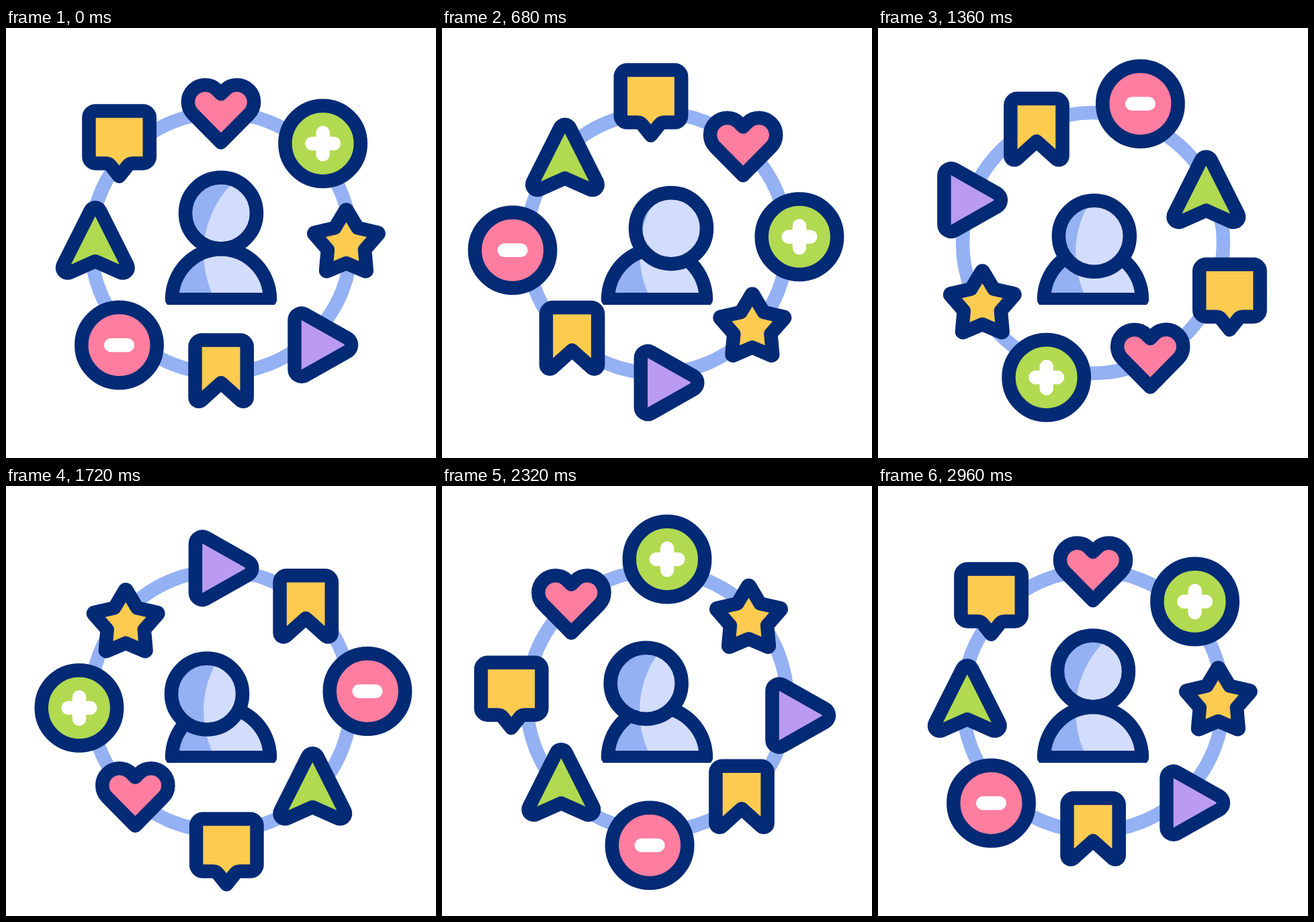
An HTML page with a canvas that plays this animation: 640 px wide and 640 px high, repeating every 3 s.

```html
<!DOCTYPE html>
<html>
<head>
<meta charset="utf-8">
<style>
html, body { margin: 0; width: 100%; height: 100%; overflow: hidden; background: #fff; }
canvas { display: block; }
</style>
</head>
<body>
<canvas id="stage" width="640" height="640"></canvas>
<script>
const ctx = document.getElementById('stage').getContext('2d');
const LOOP = 3000, HEAD_REST = 40, ORBIT_REST = 66, LINE = 20.5;
const NAVY = '#032a75', BLUE = '#94b1f4', PALE = '#d2dcfd', WHITE = '#fff';
const YELLOW = '#fdcb50', PINK = '#ff7d9f', GREEN = '#b1da51', PURPLE = '#bb9bf2';

// Closed polygon from [x, y, corner radius] points
function polygon(points) {
  const path = new Path2D(), n = points.length;
  const [ax, ay] = points[0], [zx, zy] = points[n - 1];
  path.moveTo((ax + zx) / 2, (ay + zy) / 2);
  points.forEach(([x, y, r], i) => {
    const [nx, ny] = points[(i + 1) % n];
    if (r) path.arcTo(x, y, nx, ny, r);
    else path.lineTo(x, y);
  });
  path.closePath();
  return path;
}

function circle(x, y, r) {
  const path = new Path2D();
  path.arc(x, y, r, 0, 2 * Math.PI);
  return path;
}

function star(x, y, outer, inner) {
  return polygon(Array.from({ length: 10 }, (_, i) => {
    const a = i * Math.PI / 5, r = i % 2 ? inner : outer;
    return [x + r * Math.sin(a), y - r * Math.cos(a), i % 2 ? 0 : 1.5];
  }));
}

const heart = new Path2D('M320 170.4L278.4 128.2A25.3 25.3 0 0 1 314.2 92.2L320 98L325.8 92.2A25.3 25.3 0 0 1 361.6 128.2Z');
const bubble = polygon([[123.4, 123.4, 10], [213.8, 123.4, 10], [213.8, 201.4, 10],
  [184, 201.4, 9], [168.5, 220.8, 0], [153, 201.4, 9], [123.4, 201.4, 10]]);
const arrow = polygon([[132.8, 257.5, 8], [190.8, 373, 8], [132.8, 347.2, 0], [74.8, 373, 8]]);
const bookmark = polygon([[281.5, 464.5, 10], [358.7, 464.5, 10], [358.7, 562.8, 5.6],
  [320.1, 528, 0], [281.5, 562.8, 5.6]]);
const play = polygon([[429.5, 417.3, 10.5], [525.8, 471.7, 11.5], [429.5, 526.1, 10.5]]);

// x, y: arm from the hub to the icon's anchor at rest
const icons = [
  { path: heart, fill: PINK, x: 0, y: -192 },
  { path: circle(471.6, 172, 56.2), fill: GREEN, x: 151.2, y: -148.2,
    sign: new Path2D('M455.4 172H488M471.7 155.8V188.3') },
  { path: star(506.4, 321, 52, 29), fill: YELLOW, x: 186.2, y: -4.4 },
  { path: play, fill: PURPLE, x: 140.3, y: 146.6 },
  { path: bookmark, fill: YELLOW, x: 0, y: 189.6 },
  { path: circle(168.5, 472, 56.2), fill: PINK, x: -153, y: 153.6,
    sign: new Path2D('M156.2 472H180.8') },
  { path: arrow, fill: GREEN, x: -186.6, y: -3.8 },
  { path: bubble, fill: YELLOW, x: -150.7, y: -155.7 },
];

const shoulders = new Path2D('M247 404.2A73 75 0 0 1 393 404.2Z');
const light = circle(441, 335, 147);

const progress = (t, a, b) => Math.min(1, Math.max(0, (t - a) / (b - a)));
const smooth = u => u * u * (3 - 2 * u);

// Symmetric cubic ease with handles c and 1 - c
function ease(u, c) {
  let lo = 0, hi = 1;
  for (let i = 0; i < 30; i++) {
    const s = (lo + hi) / 2, q = 1 - s;
    if (3 * q * q * s * c + 3 * q * s * s * (1 - c) + s * s * s < u) lo = s;
    else hi = s;
  }
  return smooth(lo);
}

// Head swings right, rolls along the chest to the left, then rises
function headShift(t) {
  const right = 880, left = 1900;
  if (t < right) {
    const p = smooth(progress(t, HEAD_REST, right));
    return [24.5 * p, 27.5 * p ** 1.3];
  }
  if (t < left) {
    const p = smooth(progress(t, right, left));
    return [24.5 - 49.5 * p, 27.5 + 4 * p + 9.8 * Math.sqrt(p * (1 - p))];
  }
  const p = 1 - smooth(progress(t, left, LOOP - HEAD_REST));
  return [-25 * p, 31.5 * p ** 1.3];
}

function stroke(path, color) {
  ctx.strokeStyle = color;
  ctx.stroke(path);
}

function shaded(path) {
  ctx.fillStyle = BLUE;
  ctx.fill(path);
  ctx.save();
  ctx.clip(path);
  ctx.fillStyle = PALE;
  ctx.fill(light);
  ctx.restore();
  stroke(path, NAVY);
}

function draw(t) {
  ctx.fillStyle = WHITE;
  ctx.fillRect(0, 0, 640, 640);
  ctx.lineWidth = LINE;
  ctx.lineJoin = ctx.lineCap = 'round';
  stroke(circle(320, 320, 194), BLUE);

  const turn = 2 * Math.PI * ease(progress(t, ORBIT_REST, LOOP - ORBIT_REST), 0.34);
  const cos = Math.cos(turn), sin = Math.sin(turn);
  for (const { path, fill, sign, x, y } of icons) {
    ctx.save();
    ctx.translate(x * cos - y * sin - x, x * sin + y * cos - y);
    ctx.fillStyle = fill;
    ctx.fill(path);
    stroke(path, NAVY);
    if (sign) stroke(sign, WHITE);
    ctx.restore();
  }

  ctx.save();
  ctx.beginPath();
  ctx.rect(0, 0, 640, 412);
  ctx.clip();
  shaded(shoulders);
  ctx.restore();
  const [dx, dy] = headShift(t);
  shaded(circle(320 + dx, 275.6 + dy, 53));
}

const origin = performance.now();
function tick() {
  draw((performance.now() - origin) % LOOP);
  requestAnimationFrame(tick);
}
tick();
</script>
</body>
</html>
```
